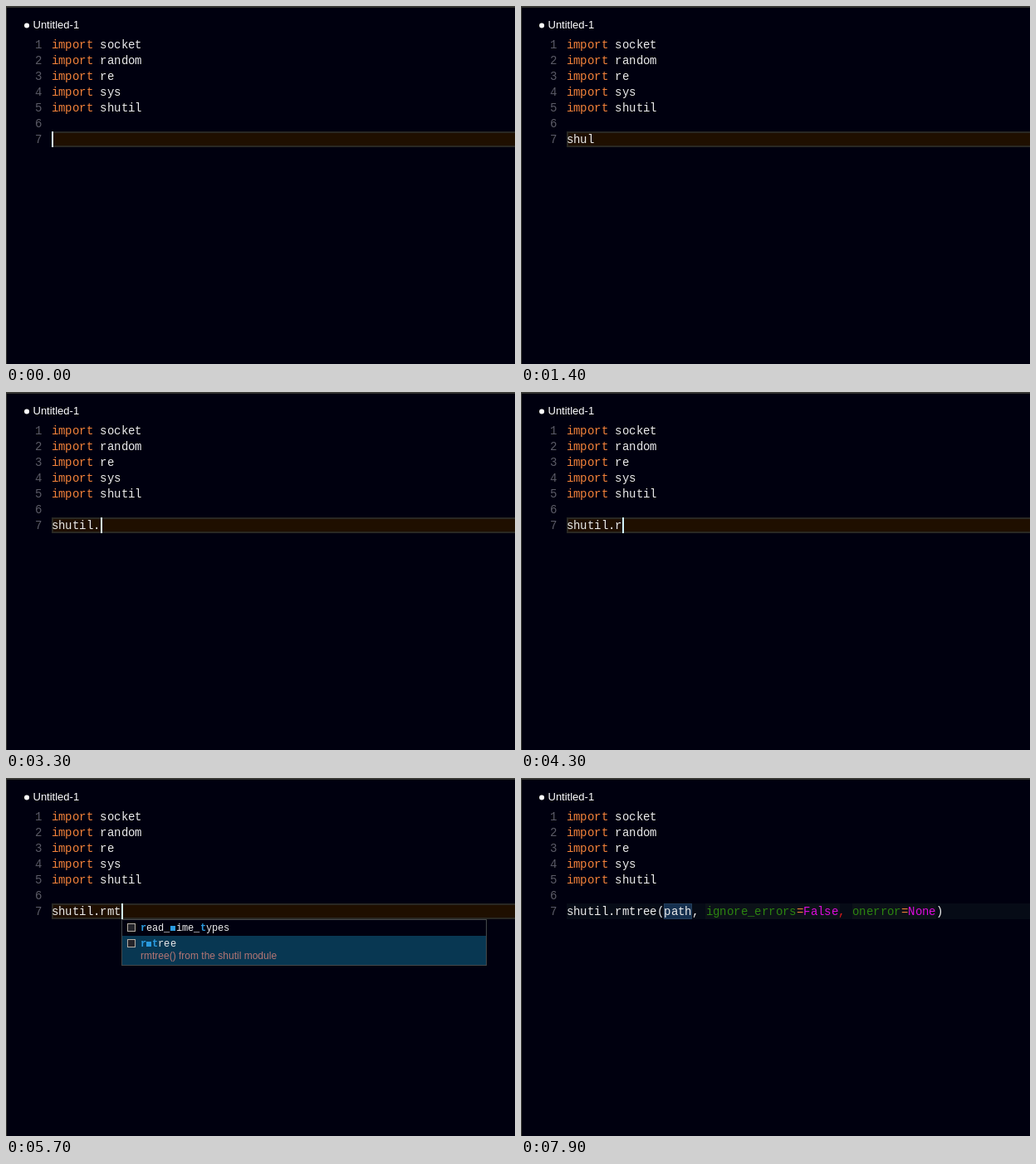
These frames come from a looping animation (613x431 px, 8 s). An HTML page with a canvas:

```html
<!DOCTYPE html>
<html lang="en">
<head>
<meta charset="utf-8">
<title>Editor autocomplete</title>
<style>
html, body { margin: 0; width: 613px; height: 431px; overflow: hidden; background: #00000f; }
canvas { display: block; }
</style>
</head>
<body>
<canvas id="stage" width="613" height="431"></canvas>
<script>
const ctx = document.getElementById('stage').getContext('2d');
const LOOP = 8000, LEFT = 55, CELL = 8.4, ROW = 19, TALL_ROW = 35, POPUP_TOP = 170, POPUP_WIDTH = 440;
const BACK = '#00000f', WHITE = '#ececec', ORANGE = '#f4823a', GREEN = '#2c8410', MAGENTA = '#dc0cdc', BLUE = '#2a9ade';
const MODULES = ['socket', 'random', 're', 'sys', 'shutil'];

// Completion lists by typed prefix; selected is the row index, scroll the thumb's top and height.
const LISTS = {
  s: { rows: 'sample seed setstate shuffle shutdown shutil socket socketpair split sub subn sys', scroll: [171, 92] },
  sh: { rows: 'shape share shell shelve shift shlex show shuffle shutdown shutil push flush', scroll: [171, 150] },
  shu: { rows: 'shuffle shutdown shutil SHUT_RD SHUT_WR' },
  shut: { rows: 'shutdown shutil SHUT_RD SHUT_WR' },
  shutil: { rows: 'shutil' },
  r: { rows: 'randint random randrange re read readline recv register remove replace reset rmtree',
       note: 'randint() from the random module', scroll: [171, 60] },
  rm: { rows: 'register_unpack_format registerDOMImplementation reset_prog_mode reset_shell_mode resize_term ' +
              'resizeterm rmd rmdir rmdir rms rmtree run_module',
        selected: 6, note: 'rmd() from the ftplib module', scroll: [248, 166] },
  rmt: { rows: 'read_mime_types rmtree', selected: 1, note: 'rmtree() from the shutil module' },
  rmtr: { rows: 'rmtree', note: 'rmtree() from the shutil module' }
};

// [time, typed text, popup prefix, popup column, caret visible]
const STEPS = [
  [0, '', '', 0, 1],
  [100, 's', '', 0, 1], [200, 's', 's', 1, 1], [300, 'sh', 's', 1, 1], [400, 'sh', 'sh', 2, 1],
  [600, 'shu', 'sh', 2, 1], [700, 'shu', 'shu', 3, 1],
  [900, 'shul', 'shu', 3, 1], [1000, 'shul', '', 0, 1], [1400, 'shul', '', 0, 0],
  [1700, 'shu', 'shu', 3, 1], [2100, 'shut', 'shut', 4, 1], [2500, 'shut', 'shut', 4, 0],
  [3000, 'shuti', 'shut', 4, 1], [3100, 'shutil', 'shutil', 6, 1],
  [3200, 'shutil.', 'shutil', 6, 1], [3300, 'shutil.', '', 0, 1], [3900, 'shutil.', '', 0, 0],
  [4300, 'shutil.r', '', 0, 1], [4400, 'shutil.r', 'r', 8, 1],
  [4500, 'shutil.rm', 'r', 8, 1], [4600, 'shutil.rm', 'rm', 9, 1], [5100, 'shutil.rm', 'rm', 9, 0],
  [5600, 'shutil.rmt', 'rm', 9, 1], [5700, 'shutil.rmt', 'rmt', 10, 1],
  [5800, 'shutil.rmtr', 'rmt', 10, 1], [5900, 'shutil.rmtr', 'rmtr', 11, 1],
  [6300, 'snippet', '', 0, 1], [6900, 'snippet', '', 0, 0],
  [7500, 'snippet', '', 0, 1], [7900, 'snippet', '', 0, 0]
];

const column = n => LEFT + n * CELL;

function box(x, y, w, h, color) {
  ctx.fillStyle = color;
  ctx.fillRect(x, y, w, h);
}

function outline(x, y, w, h, color) {
  ctx.strokeStyle = color;
  ctx.lineWidth = 1;
  ctx.strokeRect(x + .5, y + .5, w - 1, h - 1);
}

function sans(text, x, y, size, color) {
  ctx.font = `${size}px "Liberation Sans", Arial, sans-serif`;
  ctx.fillStyle = color;
  ctx.fillText(text, x, y);
}

// Each glyph sits on a whole pixel of the character grid.
function mono(text, x, y, color, size = 14, weight = 400) {
  ctx.font = `${weight} ${size}px "Liberation Mono", monospace`;
  ctx.fillStyle = color;
  [...text].forEach((c, i) => ctx.fillText(c, Math.floor(x + i * size * .6), y));
}

// Indices of matched letters: a contiguous run if there is one, else the first subsequence.
function matches(word, prefix) {
  const lower = word.toLowerCase(), run = lower.indexOf(prefix);
  let from = run < 0 ? 0 : run;
  return [...prefix].map(c => {
    const at = lower.indexOf(c, from);
    from = at + 1;
    return at;
  });
}

function completion(word, prefix, x, y) {
  const hits = matches(word, prefix);
  [...word].forEach((c, i) => {
    const cx = Math.floor(x + i * 7.2), hit = hits.includes(i);
    if (hit && c === 'm') box(cx, y - 6, 6, 6, BLUE);
    else if (hit && c === 'M') box(cx, y - 9, 6, 9, BLUE);
    else mono(c, cx, y, hit ? BLUE : WHITE, 12, hit ? 700 : 400);
  });
}

function icon(x, y) {
  box(x, y, 10, 10, '#24242a');
  outline(x, y, 10, 10, '#8e8880');
  ctx.setLineDash([1, 1]);
  outline(x, y, 10, 10, '#d8d0c4');
  ctx.setLineDash([]);
}

function popup(prefix, col) {
  const { rows, selected = 0, note, scroll } = LISTS[prefix];
  const words = rows.split(' '), x = Math.round(column(col));
  const height = words.length * ROW + (note ? TALL_ROW - ROW : 0) + 2;
  box(x, POPUP_TOP, POPUP_WIDTH, height, BACK);
  let y = POPUP_TOP + 1;
  words.forEach((word, i) => {
    const active = i === selected, tall = active && note;
    if (active) box(x + 1, y, POPUP_WIDTH - 2, tall ? TALL_ROW : ROW, '#083752');
    icon(x + 7, y + 4);
    completion(word, prefix, x + 23, y + 13);
    if (tall) sans(note, x + 23, y + 28, 12, '#b47674');
    y += tall ? TALL_ROW : ROW;
  });
  if (scroll) box(x + 429, scroll[0], 10, scroll[1], 'rgba(255,255,255,.16)');
  outline(x, POPUP_TOP, POPUP_WIDTH, height, '#44484a');
}

function snippet() {
  box(LEFT, 151, 558, 19, '#060b16');
  box(222, 151, 162, 19, '#0c1218');
  box(399, 151, 101, 19, '#0c1218');
  box(172, 151, 34, 19, '#15304f');
  outline(172, 151, 34, 19, '#243f5c');
  let col = 0;
  [['shutil.rmtree(path, ', WHITE], ['ignore_errors', GREEN], ['=', ORANGE], ['False', MAGENTA],
   [', ', '#d81c1c'], ['onerror', GREEN], ['=', ORANGE], ['None', MAGENTA], [')', WHITE]
  ].forEach(([text, color]) => {
    mono(text, column(col), 165, color);
    col += text.length;
  });
}

function draw(time) {
  const [, text, prefix, col, caret] = STEPS.findLast(step => step[0] <= time);
  box(0, 0, 613, 431, BACK);
  box(0, 0, 613, 2, '#383834');
  box(0, 0, 1, 431, '#383834');

  ctx.fillStyle = '#fff';
  ctx.beginPath();
  ctx.arc(25, 23.5, 3, 0, Math.PI * 2);
  ctx.fill();
  sans('Untitled-1', 32.5, 27, 13, '#fff');

  for (let i = 0; i < 7; i++) mono(String(i + 1), 35.6, 51 + i * ROW, '#5a5a66');
  MODULES.forEach((name, i) => {
    mono('import', LEFT, 51 + i * ROW, ORANGE);
    mono(name, column(7), 51 + i * ROW, WHITE);
  });

  const filled = text === 'snippet';
  if (filled) {
    snippet();
  } else {
    box(LEFT, 151, 558, 19, '#1f0f00');
    ctx.strokeStyle = '#292823';
    ctx.lineWidth = 2;
    ctx.strokeRect(LEFT + 1, 152, 570, 17);
    mono(text, LEFT, 165, WHITE);
  }
  if (caret) box(Math.round(column(filled ? 18 : text.length)), 151, 2, 19, '#d2f2fa');
  if (prefix) popup(prefix, col);
}

function tick() {
  draw(performance.now() % LOOP);
  requestAnimationFrame(tick);
}
tick();
</script>
</body>
</html>
```
